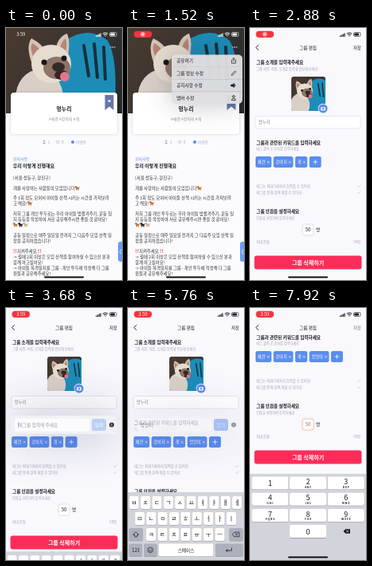
These frames come from a looping animation (146 by 316 pixels, 8000 ms). An HTML page with a canvas:

```html
<!DOCTYPE html>
<html lang="ko">
<head>
<meta charset="utf-8">
<title>그룹 편집</title>
<style>
html,body{margin:0;width:100%;height:100%;overflow:hidden;background:#f8f8fd}
canvas{display:block;width:146px;height:316px}
</style>
</head>
<body>
<canvas id="stage"></canvas>
<script>
const W = 146, H = 316, LOOP = 8000;
const cv = document.getElementById('stage'), c = cv.getContext('2d');
const dpr = window.devicePixelRatio || 1;
cv.width = W * dpr; cv.height = H * dpr;

const FONT = '"Noto Sans CJK KR","Noto Sans CJK",Inter,sans-serif';
const BLUE = '#5b8def', INK = '#18181f', GREY = '#a3a5b3', PAGE = '#f8f8fd';
const GROUP = '멍누리';

const clamp = x => Math.max(0, Math.min(1, x));
const ease = (t, from, dur) => { const x = clamp((t - from) / dur); return x * x * (3 - 2 * x); };
const easeOut = (t, from, dur) => 1 - (1 - clamp((t - from) / dur)) ** 3;
const pulse = (t, a, b, dur) => ease(t, a, dur) - ease(t, b, dur);

function text(s, x, y, size, color = INK, align = 'left', weight = 400) {
  c.font = `${weight} ${size}px ${FONT}`;
  c.fillStyle = color;
  c.textAlign = align;
  c.textBaseline = 'middle';
  c.fillText(s, x, y);
  return c.measureText(s).width;
}
function box(x, y, w, h, r, fill, stroke, lw = .5) {
  c.beginPath();
  c.roundRect(x, y, w, h, r);
  if (fill) { c.fillStyle = fill; c.fill(); }
  if (stroke) { c.strokeStyle = stroke; c.lineWidth = lw; c.stroke(); }
}
function oval(x, y, rx, ry, fill, rot = 0) {
  c.beginPath();
  c.ellipse(x, y, rx, ry, rot, 0, 7);
  c.fillStyle = fill;
  c.fill();
}
function ring(x, y, r, color, lw) {
  c.beginPath();
  c.arc(x, y, r, 0, 7);
  c.strokeStyle = color;
  c.lineWidth = lw;
  c.stroke();
}
function shape(d, color, lw, x = 0, y = 0) {
  c.save();
  c.translate(x, y);
  c.lineCap = c.lineJoin = 'round';
  const p = new Path2D(d);
  if (lw) { c.strokeStyle = color; c.lineWidth = lw; c.stroke(p); }
  else { c.fillStyle = color; c.fill(p); }
  c.restore();
}
function layer(draw, { x = 0, y = 0, alpha = 1, scale = 1 } = {}) {
  c.save();
  c.globalAlpha *= alpha;
  c.translate(x, y);
  c.scale(scale, scale);
  draw();
  c.restore();
}
function clip(x, y, w, h, r, draw) {
  c.save();
  c.beginPath();
  c.roundRect(x, y, w, h, r);
  c.clip();
  draw();
  c.restore();
}
function shadow(color, blur, draw) {
  c.save();
  c.shadowColor = color;
  c.shadowBlur = blur * dpr;
  draw();
  c.restore();
}

// Photo as flat shapes: a pale dog on a blue chair
function dogPhoto() {
  const g = c.createLinearGradient(0, 0, W, 107);
  g.addColorStop(0, '#4a3a2e');
  g.addColorStop(.5, '#3a3532');
  g.addColorStop(1, '#23282b');
  c.fillStyle = g;
  c.fillRect(0, 0, W, 107);
  shape('M74 16Q104 -4 128 16Q142 40 136 107H60Z', '#1d8db8');
  shape('M98 22L104 60M111 20L115 62M123 24L125 64', '#17303c', 4);
  oval(42, 88, 30, 36, '#d8d0c6');
  shape('M34 48Q24 24 32 13Q46 20 52 32Z M62 27Q66 10 77 7Q82 20 77 38Z', '#d6c3b5');
  shape('M36 40Q29 25 33 19Q42 24 46 33Z M67 28Q70 16 75 13Q78 22 74 34Z', '#b58578');
  oval(57, 45, 25, 24, '#e6dcd0');
  oval(64, 50, 17, 14, '#8d7567');
  oval(66, 49, 8, 6, '#332a2a');
  oval(70, 59, 9, 6, '#3a2427');
  oval(74, 61, 6, 6, '#e0788a');
  oval(48, 43, 3.5, 3.5, '#17171a');
  oval(73, 38, 3.5, 3.5, '#17171a');
}
function avatar() {
  clip(52, 61, 43, 43, 3, () => layer(dogPhoto, { x: 46, y: 61, scale: .405 }));
  oval(92, 101, 6.3, 6.3, '#fff');
  oval(92, 101, 5.6, 5.6, BLUE);
  box(89.2, 99.2, 5.6, 4.2, 1, '#fff');
  oval(92, 101.3, 1.2, 1.2, BLUE);
}

function statusBar(t, color) {
  const rec = ease(t, 200, 250);
  const icon = rec - ease(t, 2900, 250);
  layer(() => box(7.5, 3.8, 22.5, 8.2, 4.1, '#f5333f'), { alpha: rec });
  layer(() => text('3:59', 18.7, 8, 5.6, rec ? '#fff' : color, 'center', 500), { alpha: 1 - icon });
  layer(() => {
    ring(18.7, 7.9, 2.5, '#fff', .7);
    oval(18.7, 7.9, 1.3, 1.3, '#fff');
  }, { alpha: icon });
  for (let i = 0; i < 4; i++) box(113 + i * 1.8, 9.5 - i, 1.2, 1.5 + i, .3, color);
  shape('M122 7Q125 4.5 128 7M123.3 8.6Q125 7.2 126.7 8.6M125 10.2V10.3', color, 1);
  box(130.5, 5.5, 8.5, 5, 1.4, null, color, .6);
  box(131.4, 6.4, 5.6, 3.2, .7, color);
}
const homeBar = () => box(48, 311.5, 50, 2, 1, '#111');

const TAN = '#c2793c';
const notice = [
  [188, '[서울 성동구, 광진구]'],
  [201, '개를 사랑하는 사람들의 모임입니다', TAN],
  [213, '주 1회 정도 모여서 아이들 산책 시키는 시간을 가져보려'],
  [220, '고 해요!', TAN],
  [233, '저희 그룹 개인 투두로는 우리 아이들 밥챙겨주기, 운동 일'],
  [240, '지 등등을 작성하여 서로 공유해주시면 좋을 것 같아요!'],
  [260, '공동 일정으로 매주 일요일 전까지 그 다음주 모임 산책 일'],
  [267, '정을 공지하겠습니다!'],
  [287, '-> 월에 2회 이상은 모임 산책을 참여하실 수 있으신 분과'],
  [294, '함께 하고싶어요!'],
  [301, '-> 아이들 목격일지를 그룹 - 개인 투두에 작성해 다 그룹'],
  [308, '원들과 공유해주세요!']
];
function puppy(x, y, color) {
  oval(x, y, 2.3, 1.6, color);
  oval(x - 1.8, y - 1.6, 1.4, 1.4, color);
  shape('M-1.3 0V2.4M1.3 0V2.4M1.8 -.5L2.8 -1.8', color, .8, x, y);
}
function groupPage(t) {
  c.fillStyle = '#fbfbfe';
  c.fillRect(0, 0, W, H);
  clip(0, 0, W, 107, 0, dogPhoto);
  for (let i = 0; i < 3; i++) oval(132 + i * 2.4, 24, .7, .7, '#fff');
  shadow('rgba(60,60,110,.2)', 4, () => box(6, 81, 134, 52, 4, '#fff'));
  shape('M124.5 84H135.5V103L130 98.5L124.5 103Z', '#6478a8');
  oval(130, 91.5, 1.8, 1.6, '#dfe8fa');
  text(GROUP, 73, 101, 6.8, INK, 'center', 700);
  text('#애견 #강아지 #개', 73, 114, 5, '#8b90a6', 'center');
  oval(48, 141.5, 1.1, 1.1, GREY);
  shape('M46 145Q48 141.5 50 145Z', GREY);
  text('2', 53, 143, 4.5, GREY);
  shape('M65 145L62.8 142.5Q63.5 140.5 65 142Q66.5 140.5 67.2 142.5Z', GREY, .6);
  text('0', 70, 143, 4.5, GREY);
  oval(84, 143, 2.1, 2.1, BLUE);
  text('미션반', 88, 143, 4.5, GREY);
  text('공지사항', 8.7, 164, 5, BLUE);
  text('우리 이렇게 진행해요', 8.7, 172.3, 6, INK, 'left', 700);
  for (const [y, s, pet] of notice) {
    const w = text(s, 9, y, 5.35, '#30303a');
    if (pet) puppy(12.5 + w, y, pet);
  }
  for (const x of [9, 40]) text('!!', x, 280, 6, '#ee3344', 'left', 800);
  text('지켜주세요', 14, 280, 5.35, '#30303a');
  [TAN, '#2b2928', '#c9b29a'].forEach((k, i) => puppy(12 + i * 6.5, 247, k));
  box(141, 268, 9, 25, 3, '#6e9bf0');
  shape('M144.8 278L143.2 280.5L144.8 283', '#fff', .8);
  statusBar(t, '#fff');
  homeBar();
}

const menuRows = ['공유하기', '그룹 정보 수정', '공지사항 수정', '멤버 수정'];
const menuIcons = [
  'M-2 -1H-2.5V3H2.5V-1H2M0 1V-3.5M-1.3 -2.2L0 -3.5L1.3 -2.2',
  'M-2.5 2.5L-2 .8L1.6 -2.8L2.8 -1.6L-.8 2Z',
  'M-3 -1H-1.5L.3 -2.5V2.5L-1.5 1H-3ZM1.6 -1.4Q2.8 0 1.6 1.4',
  'M-1.4 -1.5A1.4 1.4 0 1 0 1.4 -1.5A1.4 1.4 0 1 0 -1.4 -1.5M-2.6 2.8Q-2.6 .8 0 .8Q2.6 .8 2.6 2.8Z'
];
function menu() {
  shadow('rgba(40,40,60,.3)', 34, () => box(-89, 0, 89, 61.5, 5, 'rgba(226,224,226,.95)'));
  menuRows.forEach((s, i) => {
    const y = 7.7 + i * 15.4;
    if (i) box(-89, y - 7.9, 89, .4, 0, 'rgba(60,60,70,.22)');
    text(s, -83, y, 5.7);
    shape(menuIcons[i], INK, .7, -11, y);
    if (i === 2) shape(menuIcons[i], INK, 0, -11, y);
  });
}

function heading(y, title, sub) {
  text(title, 8, y, 5.6, INK, 'left', 700);
  text(sub, 8, y + 8.3, 4.2, GREY);
}
function tagRow(tags) {
  let x = 7;
  for (const s of tags) {
    c.font = `500 5.2px ${FONT}`;
    const w = c.measureText(s).width + 10.5;
    box(x, 161, w, 14, 2.5, BLUE);
    text(s, x + 2.8, 168, 5.2, '#fff', 'left', 500);
    shape('M-1.2 -1.2L1.2 1.2M1.2 -1.2L-1.2 1.2', '#fff', .6, x + w - 4, 168.2);
    x += w + 2.5;
  }
  box(x, 161, 15, 14, 2.5, BLUE);
  shape('M-2.4 0H2.4M0 -2.4V2.4', '#fff', .8, x + 7.5, 168);
}
function editPage(t) {
  const focus = t > 7280;
  c.fillStyle = PAGE;
  c.fillRect(0, 0, W, H);
  layer(() => {
    heading(43, '그룹 소개를 입력해주세요', '그룹 사진, 이름, 소개를 입력해 완성해 보세요');
    avatar();
    box(7, 110.5, 132, 15.5, 2.5, '#fff', '#cfd0da');
    text(GROUP, 10.5, 118.3, 5.5, '#85879a');
    heading(143.5, '그룹과 관련된 키워드를 입력하세요', '태그 클릭 후 글자를 입력하세요');
    tagRow(['애견', '강아지', '개'].concat(t > 5650 ? '멍멍이' : []));
    ['태그는 최대 5개까지 입력할 수 있어요', '태그를 통해 검색 해볼 수 있어요'].forEach((s, i) => {
      text(s, 8, 198.5 + i * 8, 4.4, GREY);
      shape('M-1.7 0L-.4 1.3L1.9 -1.3', '#b7bac8', .6, 137, 198.5 + i * 8);
    });
    heading(230, '그룹 인원을 설정하세요', '인원을 설정하여 입력하세요');
    box(66, 246, 14, 14, 2.5, '#fff', focus ? '#e3a77c' : '#cfd0da', .7);
    text('50', 73, 253, 6, focus ? '#77717a' : INK, 'center');
    text('명', 83, 253, 5.6);
    text('최대 인원', 8, 268, 4.3, GREY);
    text('50명', 139, 268, 4.3, GREY, 'right');
    box(5.5, 285.5, 135, 17, 3, '#fb2d58');
    text('그룹 삭제하기', 73, 294, 7, '#fff', 'center', 700);
  }, { y: -107 * ease(t, 7300, 340) });
  c.fillStyle = PAGE;
  c.fillRect(0, 0, W, 32);
  shape('M10.5 21.5L7.5 24.5L10.5 27.5', INK, .9);
  text('그룹 편집', 73, 24.5, 5.6, INK, 'center', 500);
  text('저장', 140, 24.5, 5.4, focus ? '#777985' : INK, 'right', 500);
  homeBar();
}

// [time, key, field content after the press]
const typing = [
  [4080, 'ㅁ', 'ㅁ'], [4240, 'ㅓ', '머'], [4400, 'ㅇ', '멍'], [4560, 'ㅁ', '멍ㅁ'],
  [4700, 'ㅓ', '멍머'], [4880, 'ㅇ', '멍멍'], [5040, 'ㅇ', '멍멍ㅇ'], [5200, 'ㅣ', '멍멍이']
];
function tagPanel(t, last) {
  const value = last ? last[2] : '';
  shadow('rgba(40,40,90,.4)', 60, () => box(6, 135, 134, 23, 4, '#f1f1f5'));
  box(11, 138.5, 94, 16, 3, '#fbfbfd');
  const w = text(value || '태그를 입력해 주세요', 15.5, 146.5, 5.7, value ? INK : '#9a9ca9');
  if (t % 1000 < 700) box(value ? 15.5 + w : 15, 143, .6, 7, 0, BLUE);
  box(108, 139, 18, 15, 3, value ? BLUE : '#bcd0f6');
  text('입력', 117, 146.5, 5.7, '#fff', 'center', 500);
  oval(133, 146.5, 3, 3, '#35363f');
  text('i', 133, 146.5, 4.5, '#fff', 'center', 700);
}

function key(x, y, w, s, size = 7.5, fill = '#fff') {
  box(x, y + .6, w, 16, 2, '#8f929b');
  box(x, y, w, 16, 2, fill);
  text(s, x + w / 2, y + 8, size, INK, 'center');
}
const DARK = '#acb1bc';
function hangulBoard(pressed) {
  c.fillStyle = '#d2d4db';
  c.fillRect(0, 208, W, 110);
  const rows = [['ㅂㅈㄷㄱㅅㅛㅕㅑㅐㅔ', 1.5], ['ㅁㄴㅇㄹㅎㅗㅓㅏㅣ', 8.7], ['ㅋㅌㅊㅍㅠㅜㅡ', 23]];
  rows.forEach(([s, x], r) => [...s].forEach((k, i) =>
    key(x + i * 14.4, 213 + r * 20, 12.2, k, 7.5, k === pressed ? '#b3b6bf' : '#fff')));
  key(1.5, 253, 17, '', 6, DARK);
  shape('M0 -3L3.5 .5H1.5V3H-1.5V.5H-3.5Z', INK, .7, 10, 261);
  key(127.5, 253, 17, '', 6, DARK);
  backspace(136, 261, false);
  key(1.5, 272.5, 16.5, '123', 5.6, DARK);
  key(20, 272.5, 16.5, '', 6, DARK);
  ring(28.2, 280.5, 3.3, INK, .7);
  shape('M-1.2 -1V-.8M1.2 -1V-.8M-1.5 1Q0 2.3 1.5 1', INK, .7, 28.2, 280.5);
  key(38.5, 272.5, 69, '스페이스', 5.6);
  key(110, 272.5, 34.5, '', 6, DARK);
  shape('M3.5 -2V1H-3.5M-1.7 -.8L-3.5 1L-1.7 2.8', INK, .8, 127, 280.2);
  ring(16, 301, 4.3, '#50535c', .7);
  shape('M-4.3 0H4.3M0 -4.3V4.3M0 -4.3Q-4 0 0 4.3M0 -4.3Q4 0 0 4.3', '#50535c', .6, 16, 301);
  box(128.5, 296, 3, 6, 1.5, null, '#50535c', .7);
  shape('M-3 -1Q-3 3 0 3Q3 3 3 -1M0 3V5', '#50535c', .7, 130, 301);
  homeBar();
}
function backspace(x, y, solid) {
  shape('M-4.5 0L-1.8 -2.8H4V2.8H-1.8Z', INK, solid ? 0 : .7, x, y);
  shape('M-.6 -1.2L1.8 1.2M1.8 -1.2L-.6 1.2', solid ? '#fff' : INK, .7, x, y);
}
const letters = ['', 'ABC', 'DEF', 'GHI', 'JKL', 'MNO', 'PQRS', 'TUV', 'WXYZ'];
function numberPad() {
  c.fillStyle = '#d2d4db';
  c.fillRect(0, 208, W, 110);
  for (let i = 0; i < 10; i++) {
    const last = i === 9, x = last ? 50 : 2.2 + (i % 3) * 47.8, y = 211.5 + Math.floor(i / 3) * 20.2;
    key(x, y, 46, '');
    const sub = last ? '' : letters[i];
    text(last ? '0' : i + 1, x + 23, y + (sub ? 6.3 : 8), 9, INK, 'center');
    if (sub) text([...sub].join(' '), x + 23, y + 13, 3.4, INK, 'center', 600);
  }
  backspace(122, 280, true);
  homeBar();
}

function draw(t) {
  c.setTransform(dpr, 0, 0, dpr, 0, 0);
  c.clearRect(0, 0, W, H);
  const push = easeOut(t, 1600, 390);
  if (push < 1) {
    layer(() => {
      groupPage(t);
      const open = pulse(t, 860, 1550, 220);
      if (open > 0) layer(menu, { x: 144, y: 33.5, alpha: open, scale: .3 + .7 * open });
    }, { x: -W * .3 * push });
  }
  if (push > 0) {
    layer(() => {
      editPage(t);
      statusBar(t, INK);
    }, { x: W * (1 - push) });
    const panel = pulse(t, 3420, 5660, 200);
    const last = typing.filter(k => k[0] <= t).pop();
    if (panel > 0) layer(() => tagPanel(t, last), { alpha: panel });
    const board = pulse(t, 3615, 5660, 340);
    if (board > 0) {
      const pressed = last && t - last[0] < 100 ? last[1] : '';
      layer(() => hangulBoard(pressed), { y: 108 * (1 - board) });
    }
    const pad = ease(t, 7300, 340);
    if (pad > 0) layer(numberPad, { y: 108 * (1 - pad) });
  }
}
const start = performance.now();
function tick() {
  draw((performance.now() - start) % LOOP);
  requestAnimationFrame(tick);
}
tick();
</script>
</body>
</html>
```
